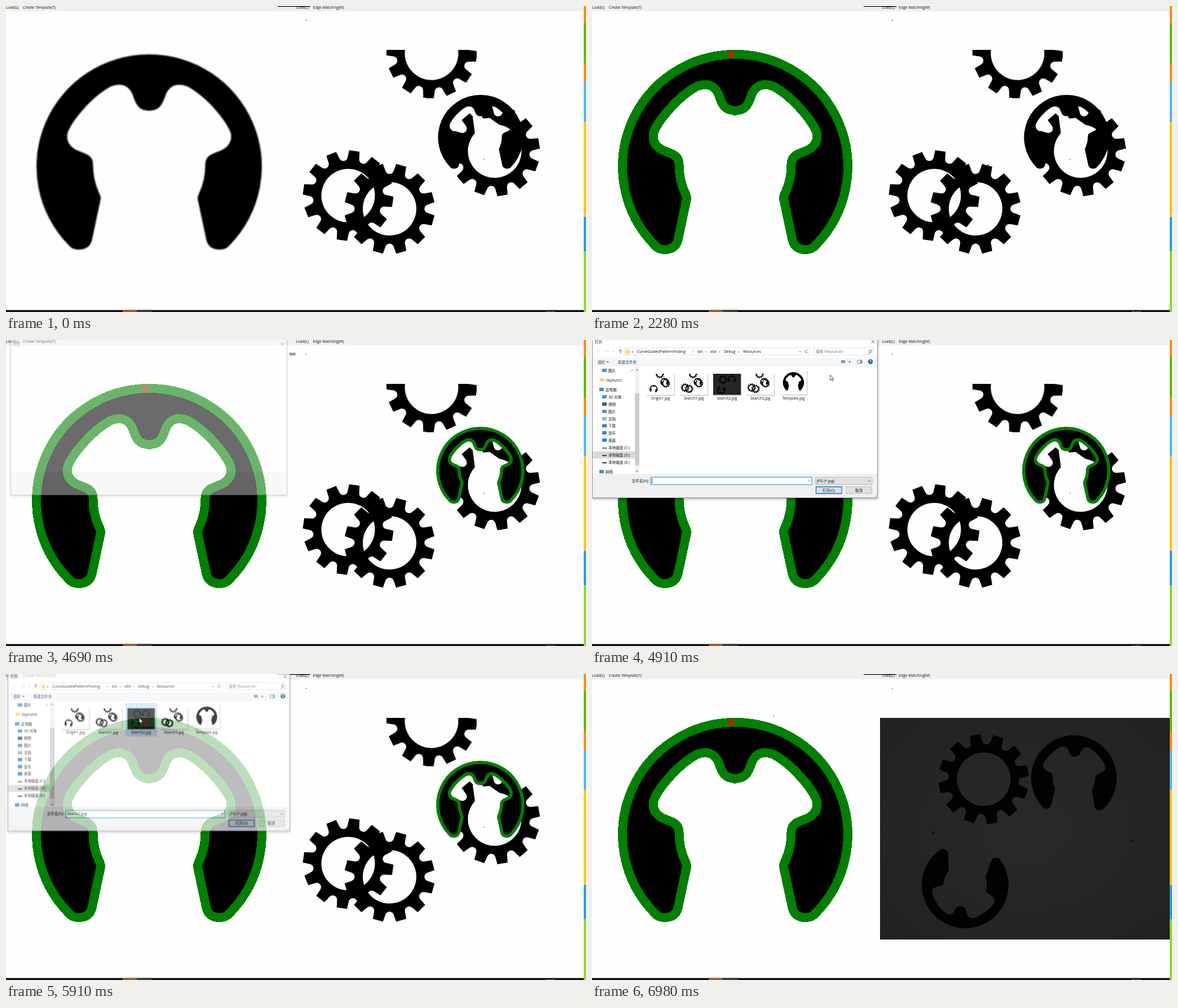
An HTML page for the animation above (8000 ms loop, 1029 by 544 pixels).

```html
<!DOCTYPE html>
<html lang="zh-CN">
<head>
<meta charset="utf-8">
<title>Edge matching</title>
<style>
html, body { margin: 0; width: 100%; height: 100%; overflow: hidden; background: #fefefe; }
svg { display: block; width: 1029px; height: 544px; }
text { font: 6.63px "Open Sans", "Noto Sans CJK SC", "Noto Sans CJK JP", "Noto Sans CJK", sans-serif; fill: #111; white-space: pre; }
.mid { text-anchor: middle; }
.end { text-anchor: end; }
.edge { fill: none; stroke: #008000; }

.anim { animation: 8s step-end infinite; }
#edges { animation-name: edges; }
#match { animation-name: match; }
#pics { animation-name: pics; }
#dark { animation-name: dark; }
#speck { animation-name: speck; }
#tip { animation-name: tip; }
#bar { animation-name: bar; }
#dialog { animation-name: dialog; transform-origin: 253px 128px; }
#content { animation-name: content; }
#hover { animation-name: hover; }
#caret { animation-name: caret; }
#file { animation-name: file; }
#arrow { animation-name: arrow; }
#resize { animation-name: resize; }

@keyframes edges { 0% { opacity: 0 } 7.875%, 100% { opacity: 1 } }
@keyframes match { 0% { opacity: 0 } 43.625%, 100% { opacity: 1 } }
@keyframes pics { 0% { opacity: 1 } 76.625%, 100% { opacity: 0 } }
@keyframes dark { 0% { opacity: 0 } 76.625%, 100% { opacity: 1 } }
@keyframes speck { 0% { opacity: 0 } 84.625%, 100% { opacity: 1 } }
@keyframes bar { 0% { opacity: 1 } 58.625% { opacity: 0 } 73.875%, 100% { opacity: 1 } }
@keyframes tip {
  0% { opacity: 0; transform: translate(703px, 282px) }
  28.5% { opacity: 1; transform: translate(703px, 282px) }
  29.625% { opacity: 1; transform: translate(760px, 270px) }
  31.25% { opacity: 1; transform: translate(832px, 255px) }
  32.625% { opacity: 0; transform: translate(832px, 255px) }
  35.375% { opacity: 1; transform: translate(939px, 191px) }
  36.75% { opacity: 1; transform: translate(955px, 158px) }
  38.125% { opacity: 1; transform: translate(972px, 122px) }
  39.5% { opacity: 1; transform: translate(986px, 92px) }
  40.875% { opacity: 1; transform: translate(993px, 76px) }
  46.25% { opacity: 1; transform: translate(999px, 76px) }
  47.625%, 100% { opacity: 0; transform: translate(999px, 76px) }
}
@keyframes dialog {
  0% { opacity: 0; transform: scale(.968) }
  58.625% { opacity: .42; transform: scale(.968) }
  60.125% { opacity: 1; transform: none }
  73.875% { opacity: .745; transform: scale(.988) }
  75.25%, 100% { opacity: 0; transform: scale(.968) }
}
@keyframes content { 0% { opacity: 0 } 60.125%, 100% { opacity: 1 } }
@keyframes hover {
  0% { opacity: 0; transform: translate(330px) }
  64% { opacity: .5; transform: translate(330px) }
  65.5% { opacity: .5; transform: translate(271px) }
  66.875% { opacity: .5; transform: translate(212px) }
  71%, 100% { opacity: 1; transform: translate(212px) }
}
@keyframes caret { 0% { opacity: 1 } 71%, 100% { opacity: 0 } }
@keyframes file { 0% { opacity: 0 } 71%, 100% { opacity: 1 } }
@keyframes arrow {
  0% { opacity: 0; transform: translate(1026px, 37px) }
  53% { opacity: 1; transform: translate(1026px, 37px) }
  54.5% { opacity: 1; transform: translate(880px, 28px) }
  55.875% { opacity: 1; transform: translate(640px, 12px) }
  57.25% { opacity: 1; transform: translate(526px, 4px) }
  58.625% { opacity: 0; transform: translate(508px, 25px) }
  60.125% { opacity: 1; transform: translate(462px, 45px) }
  61.375% { opacity: 1; transform: translate(422.5px, 62px) }
  62.75% { opacity: 1; transform: translate(392px, 82px) }
  64% { opacity: 1; transform: translate(356px, 100px) }
  65.5% { opacity: 1; transform: translate(300px, 98px) }
  66.875% { opacity: 1; transform: translate(256px, 88px) }
  68.25% { opacity: 1; transform: translate(236.5px, 78px) }
  77.75%, 100% { opacity: 0; transform: translate(236.5px, 78px) }
}
@keyframes resize { 0% { opacity: 0 } 58.625% { opacity: 1 } 60.125%, 100% { opacity: 0 } }
</style>
</head>
<body>
<svg viewBox="0 0 1029 544">
  <defs>
    <path id="half" d="M255 86A199.5 199.5 0 0 0 111 425C116 431 121 433 129 433C142 433 150 427 152.500 416L168 343Q168.500 339 165 332Q154 308 154.500 281Q154 268 142 263L125 256Q106 246 109 227C115 206 152 161 186 143Q213 133 224 156C231 176 235 186 255 186"/>
    <g id="clip">
      <use href="#half"/>
      <use href="#half" transform="matrix(-1 0 0 1 508 0)"/>
    </g>
    <path id="gear" fill-rule="evenodd"/>
    <clipPath id="frame"><path d="M511 78H1025V472H511Z"/></clipPath>
    <filter id="soft"><feGaussianBlur stdDeviation="1"/></filter>
    <filter id="shade" x="-5%" y="-5%" width="110%" height="112%"><feDropShadow dx="0" dy="2" stdDeviation="2.5" flood-opacity=".3"/></filter>
    <radialGradient id="dim" r=".75"><stop stop-color="#292929"/><stop offset="1" stop-color="#212121"/></radialGradient>

    <g id="upper" clip-path="url(#frame)">
      <use href="#gear" transform="translate(755 84) rotate(4)"/>
      <use href="#gear" transform="translate(867 258) rotate(20)"/>
      <path d="M828 197L838 191L847 200L858 199L875 211L893 219L886 225Q866 206 846 218L832 227Z" fill="#fefefe"/>
      <use href="#clip" transform="translate(746 125.500) scale(.378)"/>
      <circle cx="848" cy="272.500" r=".7"/>
    </g>
    <g id="pair">
      <use href="#upper"/>
      <use href="#gear" transform="translate(607 337) rotate(8)"/>
      <use href="#gear" transform="translate(680.500 360.500) rotate(15)"/>
    </g>
    <g id="single">
      <use href="#upper"/>
      <use href="#clip" transform="translate(640 365) rotate(8) scale(.378) translate(-254 -286)"/>
    </g>
    <g id="plate">
      <path d="M511 78H1025V472H511Z" fill="url(#dim)"/>
      <g fill="#020202">
        <use href="#gear" transform="translate(695 187) rotate(19)"/>
        <use href="#clip" transform="translate(855 185) rotate(2) scale(.38) translate(-254 -286)"/>
        <use href="#clip" transform="translate(662 375) rotate(189.400) scale(.385) translate(-254 -286)"/>
      </g>
      <g fill="#111">
        <circle cx="605.500" cy="282" r="2.800"/>
        <circle cx="957.500" cy="296" r="2.500"/>
        <circle cx="700" cy="212" r="1"/>
      </g>
    </g>
  </defs>

  <path d="M0 0H1029V544H0Z" fill="#fefefe"/>
  <path d="M0 0H1025V9.500H0Z" fill="#f0f0f0"/>
  <text x="0" y="5">Load(L)</text>
  <text x="30" y="5">Create Template(T)</text>
  <text x="514.500" y="5">Load(L)</text>
  <text x="544.500" y="5">Edge Matching(M)</text>
  <path id="bar" class="anim" d="M482 0H540V1.200H482Z"/>
  <circle cx="533" cy="25.500" r=".8"/>

  <use href="#clip" filter="url(#soft)"/>
  <g id="edges" class="anim">
    <use href="#clip" class="edge" stroke-width="16" shape-rendering="crispEdges"/>
    <path d="M246 78H262V81H246ZM252 192H255V195H252Z" fill="#008000"/>
    <path d="M246.500 80L252.500 86L246.500 92L240.500 86Z" fill="#f00"/>
  </g>
  <circle id="speck" class="anim" cx="322" cy="75" r=".8"/>

  <g id="pics" class="anim">
    <use href="#pair"/>
    <g id="match" class="anim">
      <use href="#clip" class="edge" stroke-width="15" transform="translate(745.500 124.600) scale(.378)"/>
      <circle cx="839" cy="157" r="2" fill="#b01000"/>
    </g>
  </g>
  <use id="dark" class="anim" href="#plate"/>
  <circle id="tip" class="anim" r="1"/>

  <g id="side"></g>
  <path d="M0 540.500H1025V544H0Z" fill="#0d0f16"/>
  <path d="M207 540.500H232V544H207Z" fill="#a3582a"/>
  <path d="M232 540.500H258.500V544H232Z" fill="#3b3b3d"/>
  <path d="M958 543.500H974" stroke="#bbb" stroke-dasharray="2 1.500"/>

  <g id="dialog" class="anim">
    <g filter="url(#shade)">
      <path d="M.5 -12H506.500V280.500H.5Z" fill="#fff" stroke="#9a80b8"/>
      <path d="M1 238H506V280H1Z" fill="#f0f0f0"/>
    </g>
    <text x="5" y="5.500">打开</text>
    <path d="M496 .5l5 5m0 -5l-5 5" stroke="#222" stroke-width=".8"/>
    <g id="content" class="anim">
      <g fill="none" stroke="#d9d9d9" stroke-width=".8">
        <path d="M57.500 14H386V27H57.500ZM392.500 14H499V27H392.500Z"/>
        <path d="M14 20.500H8m2.500 -2.500l-2.500 2.500l2.500 2.500M24 20.500h6m-2.500 -2.500l2.500 2.500l-2.500 2.500"/>
        <path d="M37 20l1.500 1.500l1.500 -1.500" stroke="#999"/>
        <path d="M50.500 24V17m-3 3l3 -3l3 3M367 19.500l2 2l2 -2M382 19a2.300 2.300 0 1 0 .4 2.500M493 22.500l-3 3" stroke="#444"/>
        <circle cx="494" cy="20" r="2.300" stroke="#444"/>
      </g>
      <path d="M60 17h3l1 1h3v7h-7z" fill="#ffd45e"/>
      <g id="crumbs"></g>
      <text x="397" y="23" style="fill:#6d6d6d">搜索"Resources"</text>

      <path d="M1 31H506V47.500H1Z" fill="#f5f6f7"/>
      <text x="10" y="41.500" style="fill:#1e395b">组织</text>
      <text x="46" y="41.500" style="fill:#1e395b">新建文件夹</text>
      <path d="M26 38h4l-2 2.200zM455 38h4l-2 2.200z" fill="#333"/>
      <path d="M442 36h7v5h-7z" fill="#6a9bc7"/>
      <path d="M471 36h8v5.500h-8z" fill="#fff" stroke="#456b91" stroke-width=".8"/>
      <path d="M476 36h3v5.500h-3z" fill="#6a9bc7"/>
      <circle cx="494" cy="38.500" r="4.200" fill="#1464b4"/>
      <text class="mid" x="494" y="41" style="fill:#fff;font-weight:700">?</text>

      <path d="M1 198H76V210.500H1Z" fill="#d9d9d9"/>
      <path d="M76 48H84V237H76Z" fill="#f0f0f0"/>
      <path d="M76 95H84V223H76Z" fill="#cdcdcd"/>
      <path d="M78 54l2 -2l2 2M78 232l2 2l2 -2" fill="none" stroke="#444" stroke-width=".9"/>
      <path d="M69 56l3 -3m-2 -.5l2.500 2.500" stroke="#888" stroke-width=".8"/>
      <g id="tree"></g>

      <path id="hover" class="anim" d="M.5 51.500H55.500V110H.5Z" fill="#cce8ff" stroke="#99d1ff" stroke-width=".7"/>
      <g id="files"></g>

      <text class="end" x="101" y="252.500">文件名(N):</text>
      <path d="M104 244H390V257H104Z" fill="#fff" stroke="#0078d7" stroke-width=".9"/>
      <path id="caret" class="anim" d="M106.500 246V255" stroke="#000" stroke-width=".8"/>
      <text id="file" class="anim" x="106" y="252.500">Search2.jpg</text>
      <path d="M396.500 244H497V257H396.500ZM451 261H496.500V273H451Z" fill="#e1e1e1" stroke="#adadad" stroke-width=".8"/>
      <path d="M383 249.500l2 2l2 -2M490 249.500l2 2l2 -2" fill="none" stroke="#444" stroke-width=".8"/>
      <text x="399" y="252.500">JPG (*.jpg)</text>
      <path d="M397.500 261H443V273H397.500Z" fill="#e1e1e1" stroke="#0078d7" stroke-width="1.300"/>
      <text class="mid" x="420" y="269.500">打开(O)</text>
      <text class="mid" x="473.500" y="269.500">取消</text>
      <path d="M501 279h1m1 0h1m1 0h1m-3 -2h1m1 0h1m-1 -2h1" stroke="#aaa"/>
    </g>
  </g>

  <path id="arrow" class="anim" d="M0 0V9.500L2.200 7.500L3.700 10.800L5.200 10.100L3.700 7H6.700Z" fill="#fff" stroke="#000" stroke-width=".7"/>
  <path id="resize" class="anim" d="M502.500 25l3 -2.500v1.700h5.500v-1.700l3 2.500l-3 2.500v-1.700h-5.500v1.700z" fill="#fff" stroke="#000" stroke-width=".7"/>
</svg>
<script>
const $ = id => document.getElementById(id);
const rect = (x, y, w, h, fill) => `<rect x="${x}" y="${y}" width="${w}" height="${h}" fill="${fill}"/>`;
const label = (x, y, s, cls = '') => `<text x="${x}" y="${y}" class="${cls}">${s}</text>`;

// Ring with twelve flat-topped teeth and rounded gaps
function gearPath(teeth = 12, hole = 47.5, root = 62, tip = 80.5) {
  const step = 2 * Math.PI / teeth;
  const at = (r, a) => (r * Math.cos(a)).toFixed(2) + ' ' + (r * Math.sin(a)).toFixed(2);
  let d = '';
  for (let i = 0; i < teeth; i++) {
    const a = i * step;
    d += (i ? 'L' : 'M') + at(tip, a - .115) + 'L' + at(tip, a + .115)
      + 'L' + at(69, a + .15)
      + 'C' + at(root - 2, a + .17) + ' ' + at(root - 2, a + step - .17) + ' ' + at(69, a + step - .15);
  }
  return d + `ZM${hole} 0A${hole} ${hole} 0 1 0 ${-hole} 0A${hole} ${hole} 0 1 0 ${hole} 0Z`;
}
$('gear').setAttribute('d', gearPath());

let sideY = 0;
$('side').innerHTML = [
  [30, '#ff8c0a'], [102, '#62b900'], [135, '#ff8c0a'], [206, '#4db9f2'],
  [375, '#ffc60a'], [436, '#1fa3dd'], [544, '#92d62e']
].map(([end, fill]) => {
  const s = rect(1025, sideY, 4, end - sideY, fill);
  sideY = end;
  return s;
}).join('');

$('crumbs').innerHTML = [
  [70, '«'], [80, 'CurveGuidedPatternFinding'], [178, '›'], [187, 'bin'], [201, '›'],
  [209.5, 'x64'], [225, '›'], [234, 'Debug'], [259, '›'], [268, 'Resources']
].map(([x, s]) => label(x, 23, s)).join('');

$('tree').innerHTML = [
  [18, 54, '图片', '#4a9ad4'], [14, 71, 'Skyhutch', '#ffd45e'], [13, 88, '此电脑', '#2f96dc'],
  [18, 101, '3D 对象', '#2aa5c8'], [18, 114, '视频', '#4b5a6b'], [18, 127, '图片', '#4a9ad4'],
  [18, 140, '文档', '#9ab4c8'], [18, 152.5, '下载', '#2e86d0'], [18, 165, '音乐', '#2e8ee0'],
  [18, 178, '桌面', '#1b8de0'], [18, 191, '本地磁盘 (C:)', '#6b7d8c'], [18, 204, '本地磁盘 (D:)', '#555'],
  [18, 217, '本地磁盘 (E:)', '#555'], [13, 234, '网络', '#3a8fcc']
].map(([x, y, s, fill]) => {
  const disk = s.startsWith('本地');
  return rect(x, disk ? y : y - 3, 8, disk ? 2.5 : 6, fill) + label(x + 11, y + 2.5, s);
}).join('');

const thumb = (id, x) =>
  `<use href="#${id}" transform="translate(${x - 24.5} 60) scale(.0953) translate(-511 -78)"/>`;
const card = (x, y, w, h) =>
  rect(x - w / 2 + .5, y + .8, w + .6, h + .6, '#c4c4c4') + rect(x - w / 2, y, w, h, '#fff');
$('files').innerHTML = [
  ['Origin1', 'single', 121.5], ['Search1', 'pair', 180.5], ['Search2', 'plate', 239.5], ['Search3', 'pair', 298.5]
].map(([s, id, x]) => card(x, 60, 49, 37.5) + thumb(id, x) + label(x, 106, s + '.jpg', 'mid')).join('')
  + card(357.5, 54, 47, 43)
  + '<use href="#clip" transform="translate(333.500 49) scale(.094)"/>'
  + label(357.5, 106, 'Template.jpg', 'mid');
</script>
</body>
</html>
```
